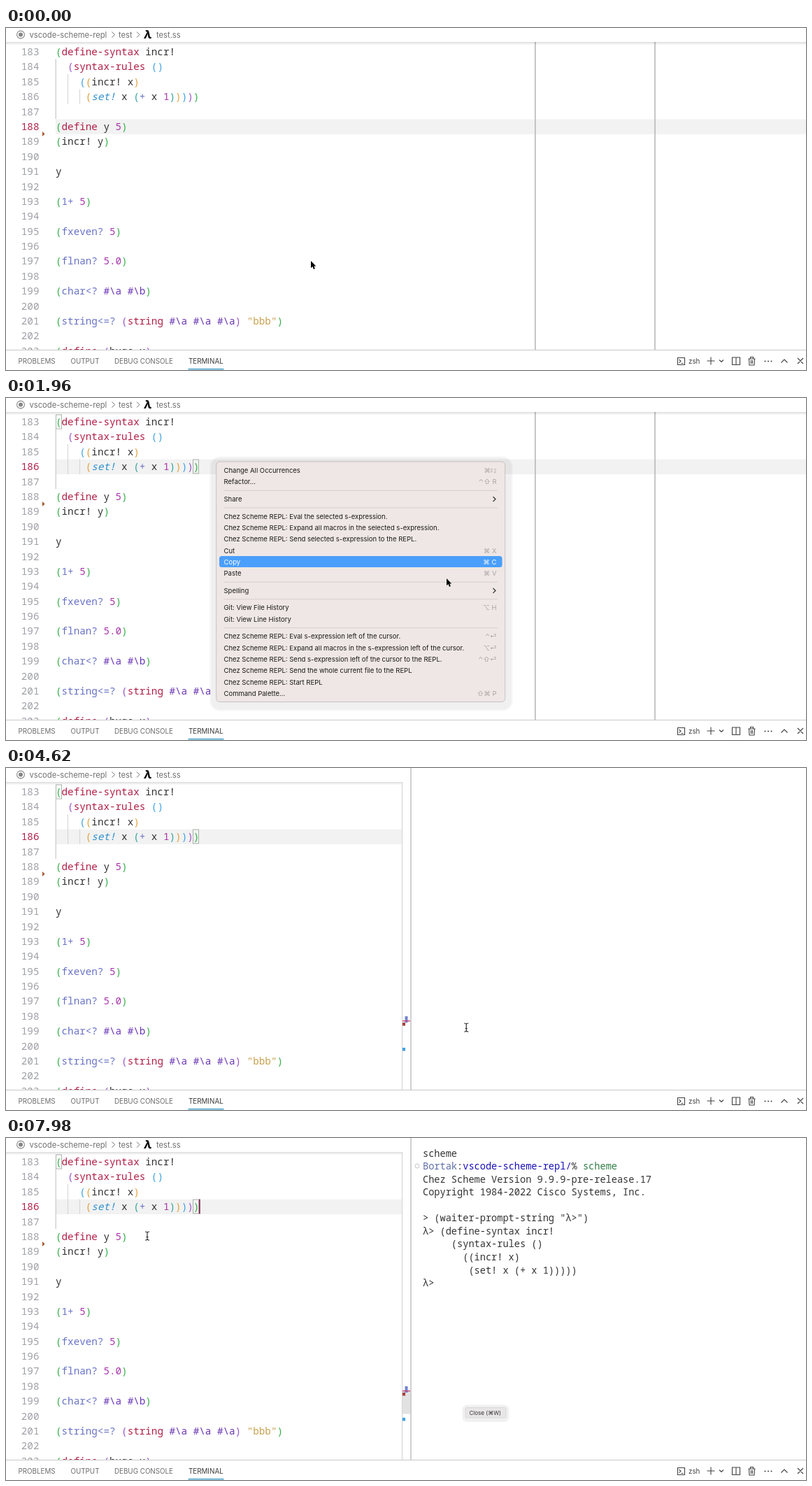
Animation, 1144 px wide and 489 px high, one loop 8 s. Source, as an HTML page:

```html
<!DOCTYPE html>
<html lang="en">
<head>
<meta charset="utf-8">
<title>Scheme REPL in an editor</title>
<style>
html, body { margin: 0; width: 100%; height: 100%; overflow: hidden; background: #fff; }
svg { display: block; width: 1144px; height: 489px; }
text { white-space: pre; font-family: Inter, "DejaVu Sans", sans-serif; }
.code text { font: 14.25px "Noto Sans Mono", "DejaVu Sans Mono", monospace; }
.term text { font: 13.63px "Noto Sans Mono", "DejaVu Sans Mono", monospace; }
.crumb text { font-size: 11.2px; }
.tabs text { font-size: 9.8px; }
.menu text { font-size: 9.5px; }
</style>
</head>
<body>
<svg id="stage" viewBox="0 0 1144 489"></svg>
<script>
const LOOP = 8000, STEP = 70;
const LINE = 21.39, FIRST = 183, ROW = 16.35, GAP = 8.2, TERM_LINE = 18.57;
const NS = "http://www.w3.org/2000/svg";
const stage = document.getElementById("stage");

function add(parent, tag, attrs = {}, content) {
  const node = document.createElementNS(NS, tag);
  for (const key in attrs) node.setAttribute(key, attrs[key]);
  if (content !== undefined) node.textContent = content;
  return parent.appendChild(node);
}
const group = (cls = "", parent = stage) => add(parent, "g", { class: cls });
const rect = (parent, x, y, width, height, fill, more) =>
  add(parent, "rect", { x, y, width, height, fill, ...more });
const stroke = (parent, d, color, width = 1) =>
  add(parent, "path", { d, fill: "none", stroke: color, "stroke-width": width });
const label = (parent, x, y, content, fill, more) =>
  add(parent, "text", { x, y, fill, ...more }, content);
const show = (node, on) => node.setAttribute("opacity", +on);
const clamp = v => Math.max(0, Math.min(1, v));
const lineY = n => 34.2 + (n - FIRST) * LINE;

const INK = {
  g: "#35b04a", p: "#9a55c8", b: "#3fa3df", o: "#e0a23c", e: "#35a39a",
  k: "#b01f48", t: "#333333", n: "#a936ac", f: "#6872c4", c: "#6a35b5",
  s: "#c8a14e", i: "#2f8fca", u: "#5f6fa8", d: "#1a10b8", h: "#2f7d46"
};

// Tokens are separated by "|"; the first letter of each picks its colour.
function tokens(parent, x, y, source) {
  const text = add(parent, "text", { x, y });
  for (const part of source.split("|")) {
    const span = add(text, "tspan", { fill: INK[part[0]] || INK.t }, part.slice(1));
    if (part[0] === "i") span.setAttribute("font-style", "italic");
  }
  return text;
}

const SOURCE = [
  "g(|kdefine-syntax|t incr!",
  "t  |p(|ksyntax-rules|t |b()",
  "t    |b(|o(|tincr! x|o)",
  "t     |o(|iset!|t x |e(|f+|t x |n1|e)|o)|b)|p)|g)",
  "",
  "g(|kdefine|t y |n5|g)",
  "g(|tincr! y|g)",
  "",
  "ty",
  "",
  "g(|f1+|t |n5|g)",
  "",
  "g(|ffxeven?|t |n5|g)",
  "",
  "g(|fflnan?|t |n5.0|g)",
  "",
  "g(|fchar<?|t |c#\\a #\\b|g)",
  "",
  "g(|fstring<=?|t |p(|kstring|t |c#\\a #\\a #\\a|p)|t |s\"bbb\"|g)",
  "",
  "g(|kdefine|t |p(|thuge x|p)"
];

// Editor
const editor = group("code");
const activeLine = rect(editor, 71, 0, 1073, LINE, "#f2f2f2");
stroke(editor, "M756.8 20V460M928 20V460", "#b0b0b0", 1.4);
stroke(editor, "M71.2 44.5V130", "#bdbdbd");
stroke(editor, "M88.5 66V109M105.5 87.5V109", "#d4d4d4");
const numbers = SOURCE.map((source, i) => {
  const n = FIRST + i, y = lineY(n) + 4.8;
  if (source) tokens(editor, 71, y, source);
  return label(editor, 21.8, y, n, "#9fa0a6");
});
add(editor, "path", { d: "M52 148L55.5 151.5L52 155Z", fill: "#a4582f" });
const match = group("", editor);
for (const [x, y] of [[71.5, 24], [267.5, 88]])
  rect(match, x, y, 8, 20, "none", { stroke: "#a9b3a9" });
const caret = rect(editor, 276, 87.5, 1.7, 21, "#8c1f55");

// Breadcrumbs
const crumb = group("crumb");
rect(crumb, 0, 0, 1144, 20, "#fff");
for (let i = 0; i < 4; i++)
  rect(crumb, 0, 20 + i, 1144, 1, "#000", { opacity: 0.12 - i * 0.03 });
add(crumb, "circle", { cx: 21, cy: 9.5, r: 5.4, fill: "none", stroke: "#858585", "stroke-width": 1.1 });
add(crumb, "circle", { cx: 21, cy: 9.5, r: 3, fill: "#858585" });
label(crumb, 33.5, 13.6, "vscode-scheme-repl", "#707070");
label(crumb, 161, 13.6, "test", "#707070");
label(crumb, 215, 13.6, "test.ss", "#707070");
stroke(crumb, "M151.5 5.5L155.5 9.5L151.5 13.5M187 5.5L191 9.5L187 13.5", "#707070");
label(crumb, 197.5, 15, "λ", "#111", { "font-weight": 800, "font-style": "italic", style: "font-size:16px" });

// Terminal split
const split = group("term");
rect(split, 567, 0, 577, 460, "#fff");
const slider = rect(split, 567, 361, 11.5, 33.5, "#e2e2e2");
stroke(split, "M566.5 20V460", "#d2d2d2");
stroke(split, "M579 0V460", "#bdbdbd", 1.4);
rect(split, 570.5, 355, 4, 9, "#7482cf");
rect(split, 567, 361, 11, 1.3, "#c8406c");
rect(split, 567, 364, 4, 4.5, "#a8403c");
rect(split, 567, 400, 4, 4.5, "#3da3e8");
const termLine = (parent, row, source) =>
  tokens(parent, 596, 26.5 + row * TERM_LINE, source);
function termBlock(from, rows) {
  const node = group("", split);
  rows.forEach(([row, source]) => termLine(node, row, source));
  return { from, node };
}
const output = [
  termBlock(4760, [[0, "tscheme"]]),
  termBlock(4900, [[1, "uBortak|t:|dvscode-scheme-repl/|t% |hscheme"]]),
  termBlock(5110, [
    [2, "tChez Scheme Version 9.9.9-pre-release.17"],
    [3, "tCopyright 1984-2022 Cisco Systems, Inc."],
    [5, "t>"]
  ]),
  termBlock(5810, [
    [5, "t  (waiter-prompt-string \"λ>\")"],
    [6, "tλ> (define-syntax incr!"],
    [7, "t     (syntax-rules ()"],
    [8, "t       ((incr! x)"],
    [9, "t        (set! x (+ x 1)))))"],
    [10, "tλ>"]
  ])
];
add(output[1].node, "circle", { cx: 588, cy: 40, r: 3, fill: "none", stroke: "#c4c4c4" });

const tip = group();
rect(tip, 652.5, 381.5, 67, 24.5, "#000", { rx: 7, opacity: 0.055 });
rect(tip, 657, 385.5, 58, 14.5, "#e8e6e6", { rx: 2, stroke: "#d2d0d0", "stroke-width": 0.7 });
label(tip, 662.5, 395.6, "Close (⌘W)", "#333", { "font-size": 8 });

// Bottom panel
const tabs = group("tabs");
rect(tabs, 0, 460, 1144, 29, "#fff");
stroke(tabs, "M0 460.5H1144", "#c9c9c9");
[[17.5, "PROBLEMS"], [92.5, "OUTPUT"], [155, "DEBUG CONSOLE"], [261, "TERMINAL"]].forEach(([x, name], i) =>
  label(tabs, x, 480, name, i === 3 ? "#3c3c3c" : "#6c6c6c"));
rect(tabs, 260.5, 487, 51, 1.4, "#3a96c0");
label(tabs, 976, 479.6, "zsh", "#424242");
stroke(tabs, "M960.5 471.5H970.5V481.5H960.5ZM962.5 474L965 476.3L962.5 478.6M965.5 479.5H968.5"
  + "M1002.5 476H1013.5M1008 470.5V481.5M1020 474.5L1023 477.5L1026 474.5"
  + "M1038.5 471H1049.5V481.5H1038.5ZM1044 471V481.5"
  + "M1061.5 473H1071.5M1064.5 473V470.5H1068.5V473M1062.5 473L1063 482H1070L1070.5 473M1065.5 475V480M1067.5 475V480"
  + "M1108.5 478.5L1113 474L1117.5 478.5M1132 472L1140 480M1140 472L1132 480", "#424242", 1.1);
for (const x of [1085.5, 1090, 1094.5]) add(tabs, "circle", { cx: x, cy: 476.5, r: 1, fill: "#424242" });

// Context menu; "-" is a separator, ">" marks a submenu
const REPL = "Chez Scheme REPL: ";
const ITEMS = [
  ["Change All Occurrences", "⌘F2"], ["Refactor...", "⌃⇧ R"], "-",
  ["Share", ">"], "-",
  [REPL + "Eval the selected s-expression."],
  [REPL + "Expand all macros in the selected s-expression."],
  [REPL + "Send selected s-expression to the REPL."],
  ["Cut", "⌘ X"], ["Copy", "⌘ C"], ["Paste", "⌘ V"], "-",
  ["Spelling", ">"], "-",
  ["Git: View File History", "⌥ H"], ["Git: View Line History"], "-",
  [REPL + "Eval s-expression left of the cursor.", "⌃⏎"],
  [REPL + "Expand all macros in the s-expression left of the cursor.", "⌥⏎"],
  [REPL + "Send s-expression left of the cursor to the REPL.", "⌃⇧⏎"],
  [REPL + "Send the whole current file to the REPL"],
  [REPL + "Start REPL"], ["Command Palette...", "⇧⌘ P"]
];
const MENU_INK = "#1c1a1a", KEY_INK = "#aaa4a3";
const menu = group("menu");
rect(menu, 291, 83, 434, 365, "#000", { rx: 15, opacity: 0.025 });
rect(menu, 293, 85, 430, 361, "#000", { rx: 13, opacity: 0.035 });
rect(menu, 300.7, 91, 413, 343.5, "#eee7e5", { rx: 5, stroke: "#c3bebd", "stroke-width": 0.9 });
const hover = rect(menu, 305, 0, 404.5, 16, "#4a9ffb", { rx: 3.5 });
const rows = [];
let y = 103.7;
for (const item of ITEMS) {
  if (item === "-") {
    stroke(menu, `M311.5 ${y - ROW / 2 + GAP / 2}H703`, "#d6cfcd");
    y += GAP;
    continue;
  }
  const [name, key] = item;
  const row = { y, name: label(menu, 311.5, y + 3.4, name, MENU_INK) };
  if (key === ">") stroke(menu, `M696.5 ${y - 3.4}L700 ${y}L696.5 ${y + 3.4}`, "#333", 1.3);
  else if (key) {
    row.key = label(menu, 701.5, y + 3.4, key[0], KEY_INK, { "text-anchor": "end" });
    const rest = add(row.key, "tspan", {}, key.slice(1));
    if (key.endsWith("F2")) rest.setAttribute("font-size", 7);
  }
  rows.push(row);
  y += ROW;
}

// Pointer
const ring = add(stage, "circle", { r: 14.7, fill: "none", "stroke-width": 2.5 });
const arrow = add(stage, "path", {
  d: "M0 0V10.3L2.4 8.1L4 11.9L5.9 11.1L4.3 7.4H7.3Z",
  fill: "#000", stroke: "#fff", "stroke-width": 1, "paint-order": "stroke"
});
const beam = stroke(stage, "M-3 -6Q0 -6 0 -4.5Q0 -6 3 -6M0 -4.5V4.5M-3 6Q0 6 0 4.5Q0 6 3 6M-1.5 1.5H1.5", "#222", 1.1);

const POINTER = [
  [70, 436, 333], [210, 402, 240], [320, 320, 120], [420, 301, 96], [1540, 301, 96],
  [1680, 395, 122], [1820, 555, 200], [1890, 604, 234], [1960, 630, 258],
  [2100, 652, 315], [2310, 659, 368], [2520, 658, 369], [2800, 657.5, 376],
  [2940, 658, 376], [3010, 658.5, 372], [3500, 659, 371], [3640, 659, 369], [3990, 658, 371],
  [7000, 659, 371], [7140, 610, 340], [7350, 410, 228], [7560, 255, 163], [7770, 204, 143], [7980, 202, 140]
];
function pointerAt(t) {
  const next = POINTER.findIndex(p => p[0] > t);
  if (next === 0) return POINTER[0].slice(1);
  if (next < 0) return POINTER[POINTER.length - 1].slice(1);
  const [t0, x0, y0] = POINTER[next - 1], [t1, x1, y1] = POINTER[next];
  const k = (t - t0) / (t1 - t0);
  return [x0 + (x1 - x0) * k, y0 + (y1 - y0) * k];
}

const CARET_ON = [[420, 910], [1190, 1820], [2310, 2800], [3290, 3850], [4340, 4480],
  [4830, 5320], [5810, 6300], [6860, 7350], [7840, 8000]];
const CLICKS = [[420, 560, 700, "#111"], [1120, 1330, 1400, "#2bbf33"], [4130, 4340, 4480, "#111"]];
const SPLIT_AT = 4620;

function draw(t) {
  const clicked = t >= 420, open = t >= SPLIT_AT;
  const current = clicked ? 186 : 188;
  activeLine.setAttribute("y", lineY(current) - LINE / 2);
  numbers.forEach((node, i) => node.setAttribute("fill", FIRST + i === current ? INK.k : "#9fa0a6"));
  show(match, clicked);
  show(caret, CARET_ON.some(([a, b]) => t >= a && t < b));

  show(split, open);
  output.forEach(({ from, node }) => show(node, t >= from));
  show(slider, clamp((t - 7210) / 140));
  show(tip, t >= 6300);

  show(menu, t < 1190 ? 0 : 1 - clamp((t - 4410) / 200));
  const [, hoverY] = pointerAt(t - STEP);
  const flashing = t >= 4340 && t < 4410;
  const picked = t > 1540 && !flashing ? rows.find(r => Math.abs(r.y - hoverY) <= ROW / 2) : null;
  show(hover, !!picked);
  if (picked) hover.setAttribute("y", Math.round(picked.y - ROW / 2));
  for (const row of rows) {
    row.name.setAttribute("fill", row === picked ? "#fff" : MENU_INK);
    if (row.key) row.key.setAttribute("fill", row === picked ? "#fff" : KEY_INK);
  }

  const [x, py] = pointerAt(t);
  const place = `translate(${x} ${py})`;
  arrow.setAttribute("transform", place);
  beam.setAttribute("transform", place);
  show(arrow, !open);
  show(beam, open);
  const click = CLICKS.find(([a, , c]) => t >= a && t < c);
  show(ring, click ? 1 - clamp((t - click[1]) / (click[2] - click[1])) : 0);
  if (click) {
    ring.setAttribute("stroke", click[3]);
    ring.setAttribute("cx", x);
    ring.setAttribute("cy", py + 0.8);
  }
}

function frame() {
  const t = performance.now() % LOOP;
  draw(Math.floor(t / STEP) * STEP);
  requestAnimationFrame(frame);
}
frame();
</script>
</body>
</html>
```
